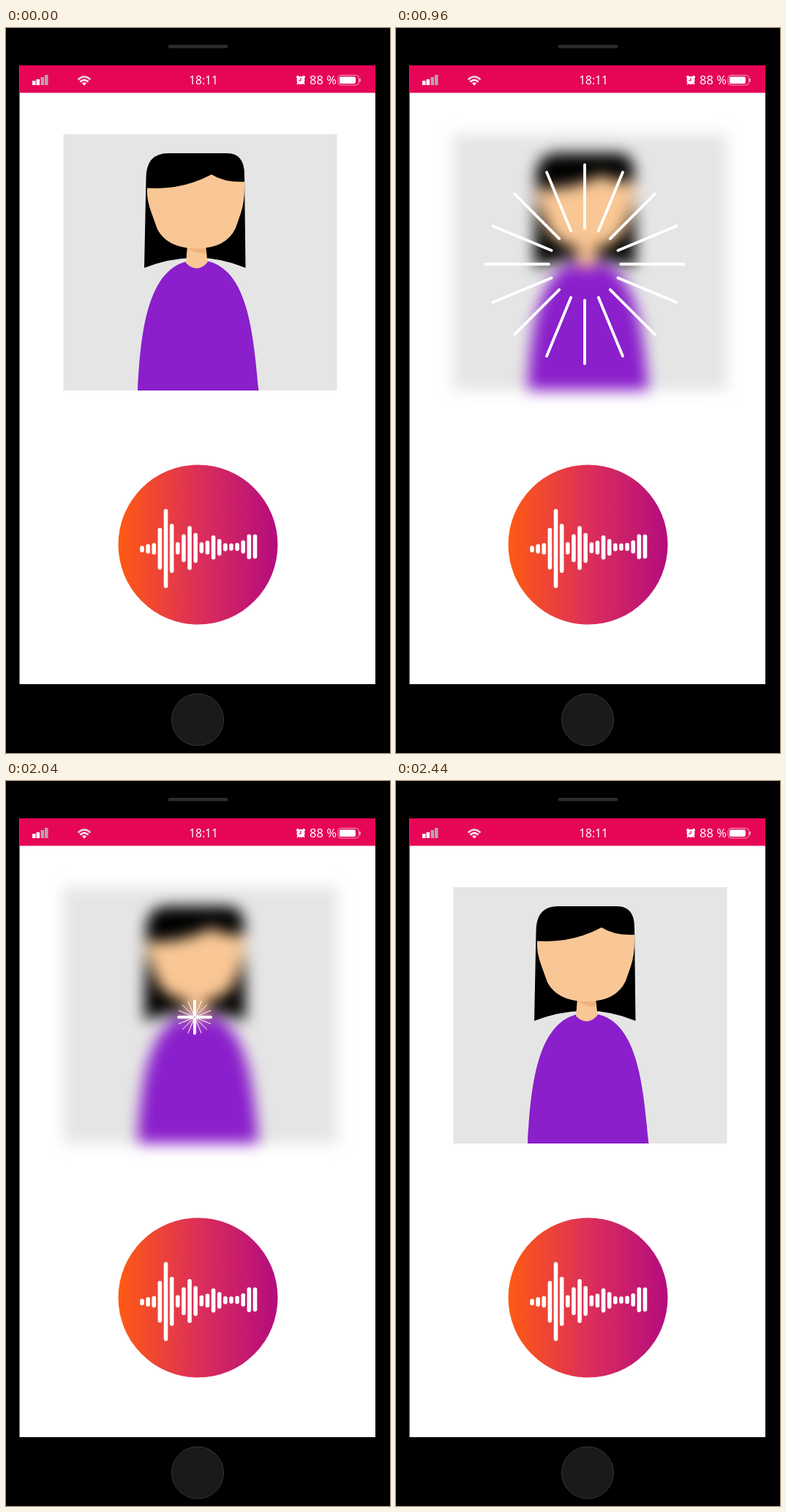
These frames come from a looping animation (525 px wide and 990 px high, 3040 ms). An HTML page:

```html
<!DOCTYPE html>
<html lang="en">
<head>
<meta charset="utf-8">
<title>Portrait blur</title>
<style>
  html, body { margin: 0; width: 100%; height: 100%; overflow: hidden; background: #000; }
  svg { display: block; width: 525px; height: 990px; }
  text { font-family: "Noto Sans", "Open Sans", sans-serif; fill: #fff; }
  #bars, #rays { stroke: #fff; stroke-linecap: round; }
  #bars { stroke-width: 5.6; }
</style>
</head>
<body>
<svg viewBox="0 0 525 990">
  <defs>
    <linearGradient id="sunset">
      <stop offset="0" stop-color="#ff5a12"/>
      <stop offset=".5" stop-color="#dc2f59"/>
      <stop offset="1" stop-color="#b40c7e"/>
    </linearGradient>
    <filter id="soft" filterUnits="userSpaceOnUse" x="18" y="88" width="487" height="470" color-interpolation-filters="sRGB">
      <feGaussianBlur stdDeviation="10"/>
    </filter>
  </defs>

  <!-- phone -->
  <rect width="525" height="990"/>
  <rect x="222" y="23" width="81" height="4.5" rx="1" fill="#2c2c2c"/>
  <circle cx="262" cy="944.5" r="35.5" fill="#1a1a1a" stroke="#363636"/>
  <rect x="18.5" y="51" width="486.5" height="845" fill="#fff"/>

  <!-- status bar -->
  <rect x="18.5" y="51" width="486.5" height="37.5" fill="#e60556"/>
  <path d="M36 72h4.5v6H36zM41.5 70H46v8h-4.500z" fill="#fff"/>
  <path d="M47.500 67H52v11h-4.500zM53 64h4.500v14H53z" fill="#b9a5ac"/>
  <g fill="none" stroke="#fff" stroke-width="2.6">
    <path d="M98.500 70.500Q107 62.500 115.500 70.500" stroke="#e9d3dc"/>
    <path d="M101.500 73.500Q107 68.500 112.500 73.500"/>
  </g>
  <path d="M104 75.500Q107 73 110 75.500L107 78.500z" fill="#fff"/>
  <text x="270" y="77" font-size="15.5" text-anchor="middle">18:11</text>
  <g fill="#fff">
    <circle cx="403" cy="71.500" r="5.500"/>
    <circle cx="399" cy="67" r="2"/>
    <circle cx="407" cy="67" r="2"/>
    <path d="M398 77l2-3M408 77l-2-3" stroke="#fff" stroke-width="1.500"/>
    <path d="M403 68v4h-3" fill="none" stroke="#e60556" stroke-width="1.200"/>
  </g>
  <text x="415" y="77" font-size="16.5">88 %</text>
  <rect x="454" y="64.500" width="28.500" height="13.500" rx="4" fill="none" stroke="#f3a3bf"/>
  <rect x="456" y="66.500" width="22" height="9.500" rx="2" fill="#fff"/>
  <path d="M484 69v4.500" stroke="#f3c3d2" stroke-width="1.500"/>

  <!-- portrait -->
  <g id="portrait">
    <rect x="78.500" y="145" width="374" height="350" fill="#e5e5e5"/>
    <path d="M189 327.500L191.500 205Q191.500 171 222 171H302Q326 171 326 200L327.500 327.500Q262 300 189 327.500z"/>
    <path d="M180 495C184 420 192 317 262 317S338 420 345.500 495z" fill="#8a1fcb"/>
    <path d="M248 296H273L275.500 320Q261 336 246 321z" fill="#f9c795"/>
    <path d="M248.500 301H273V308Q257 308 248.500 301z" fill="#f2b27c"/>
    <path d="M193 218.500Q240 222 281 200Q298 211 326 210Q327 235 321 253L314 273Q301 301 261 301Q221 301 207 275L198 250Q192 233 193 218.500z" fill="#f9c795"/>
  </g>
  <g id="rays"></g>

  <!-- voice button -->
  <circle cx="262.500" cy="705.500" r="109" fill="url(#sunset)"/>
  <g id="bars"></g>
</svg>
<script>
const LOOP = 3040, STEP = 40, STEPS = 10, PEAK = 5, SWAP = 3;
const BLUR_AT = 720, CLEAR_AT = 2040;
const RAYS = 16, CX = 258, CY = 322.5;
const portrait = document.getElementById('portrait');

function addLine(parentId) {
  const line = document.createElementNS('http://www.w3.org/2000/svg', 'line');
  return document.getElementById(parentId).appendChild(line);
}

function setLine(line, x1, y1, x2, y2) {
  Object.entries({ x1, y1, x2, y2 }).forEach(([name, value]) => line.setAttribute(name, value));
}

const heights = [9, 13, 16, 57, 108, 67, 17, 38, 60, 41, 15, 19, 33, 23, 11, 10, 11, 18, 34, 33];
heights.forEach((height, i) => {
  const x = 186 + i * 8.13, y = 711.5 - i * 0.18, reach = (height - 5.6) / 2;
  setLine(addLine('bars'), x, y - reach, x, y + reach);
});

const rays = Array.from({ length: RAYS }, () => addLine('rays'));

// Rays fly out until the peak, then each shrinks towards its own middle.
function drawBurst(step) {
  const visible = step >= 0 && step < STEPS;
  const grow = Math.min(step / PEAK, 1);
  const shrink = Math.min((STEPS - step) / PEAK, 1);
  const middle = 12.5 + 80 * grow;
  const half = (11.5 + 45 * grow) * shrink;
  rays.forEach((ray, i) => {
    ray.style.display = visible ? '' : 'none';
    if (!visible) return;
    const startWidth = i % 4 ? 1 : 4;
    const width = (startWidth + (4.8 - startWidth) * grow) * shrink;
    const reach = Math.max(half - width / 2, 0);
    const angle = i * 2 * Math.PI / RAYS;
    const dx = Math.cos(angle), dy = Math.sin(angle);
    const inner = middle - reach, outer = middle + reach;
    ray.setAttribute('stroke-width', width);
    setLine(ray, CX + dx * inner, CY + dy * inner, CX + dx * outer, CY + dy * outer);
  });
}

function frame() {
  const time = performance.now() % LOOP;
  const start = time < CLEAR_AT ? BLUR_AT : CLEAR_AT;
  const blurred = time >= BLUR_AT + SWAP * STEP && time < CLEAR_AT + SWAP * STEP;
  portrait.setAttribute('filter', blurred ? 'url(#soft)' : 'none');
  drawBurst(Math.floor((time - start) / STEP));
  requestAnimationFrame(frame);
}
frame();
</script>
</body>
</html>
```
